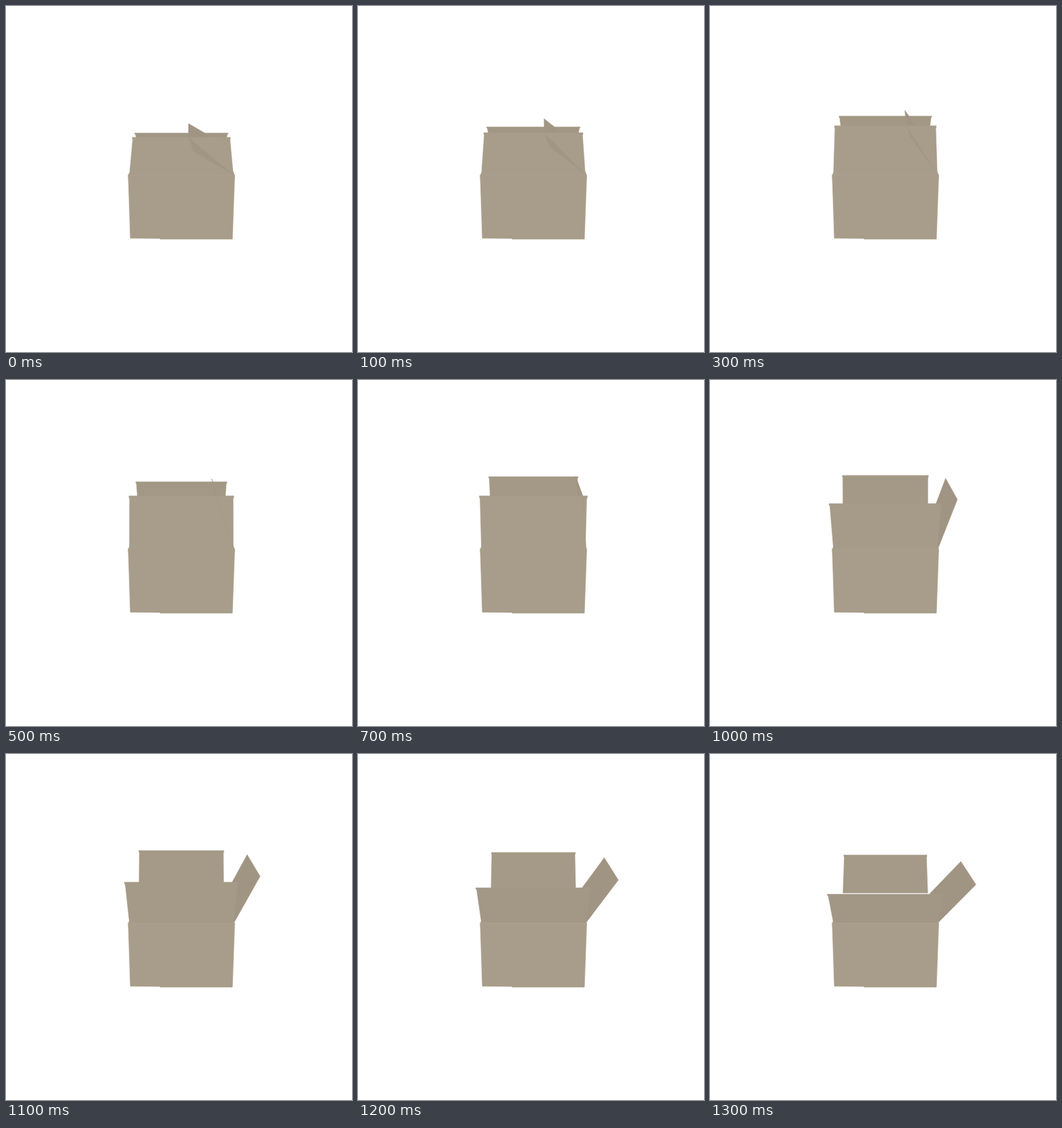
An HTML page that plays this animation: 512x512 px, repeating every 1400 ms.

```html
<!DOCTYPE html>
<html lang="en">
<head>
<meta charset="utf-8">
<title>Opening box</title>
<style>
  html, body { margin: 0; width: 100%; height: 100%; overflow: hidden; background: #fff; }
  svg { display: block; width: 100%; height: 100%; }
  polygon { stroke: #a69b88; stroke-width: 0.6; stroke-linejoin: round; }
</style>
</head>
<body>
<svg viewBox="0 0 512 512">
  <polygon id="back"/>
  <polygon id="side" fill="#a09483"/>
  <polygon id="body" fill="#a89d8a"
    points="183,246.5 336.5,246.5 338.5,250.5 338,262 335,345 228,345 228,344 184,343.7 181.3,262 180.7,250.5"/>
  <polygon id="front"/>
  <polygon id="poke" fill="#a19583"/>
  <path id="fold" d="M182 250.5H337.5" stroke="#aca18e" fill="none"/>
</svg>
<script>
const LOOP = 1400, STEP = 100;
const FOCAL = 712, DIST = 719.7, PITCH = 19.2 * Math.PI / 180;
const HALF = 78.5, DEPTH = 171, FLAP = 79.6, LIP = 0.9;
const SIN = Math.sin(PITCH), COS = Math.cos(PITCH);
const el = id => document.getElementById(id);
const rad = deg => deg * Math.PI / 180;

// x: right, h: up from the rim, d: back from the front rim
function project([x, h, d]) {
  const z = (DIST + d * COS - h * SIN) / FOCAL;
  const y = -6 - h * COS - d * SIN;
  return (259.5 + x / z).toFixed(2) + ',' + (256 + y / z).toFixed(2);
}

function setPoly(id, pts) {
  el(id).setAttribute('points', pts.map(project).join(' '));
}

// front or back flap, a little wider along its free edge
function setFlap(id, hinge, dir, deg) {
  const a = rad(deg);
  const at = (x, s) => [x, s * FLAP * Math.sin(a), hinge + dir * s * FLAP * Math.cos(a)];
  const half = [[HALF - LIP, 0], [HALF - LIP, 0.96], [HALF, 0.96], [HALF, 1]];
  const right = half.map(([x, s]) => at(x, s));
  const left = half.map(([x, s]) => at(-x, s)).reverse();
  setPoly(id, [...right, ...left]);
}

function shade(id, drop) {
  const rgb = [168, 157, 138].map(c => Math.round(c - drop));
  el(id).setAttribute('fill', `rgb(${rgb})`);
}

function draw(ms) {
  const deg = 30.65 + 7.8 * Math.floor(ms / STEP);
  const a = rad(deg);
  const run = FLAP * Math.cos(a), rise = FLAP * Math.sin(a);
  // point on the side flap at share s of its length
  const side = (s, d) => [HALF + 3 * d / DEPTH - s * run, s * rise, d];

  setFlap('back', DEPTH, -1, deg - 1);
  setFlap('front', 0, 1, deg);
  setPoly('side', [side(0, 0), side(1, 0), side(1, 168), side(0, 168)]);
  shade('back', 6 - 3 * (deg - 30) / 100);
  shade('front', Math.max(0, deg - 95) * 0.16);

  // part of the side flap that cuts through the front flap
  const crossing = run > 0;
  el('poke').style.display = crossing ? '' : 'none';
  if (crossing) setPoly('poke', [side(0, 0), side(0.88, 0), side(1, run)]);

  el('fold').style.opacity = Math.min(1, Math.abs(deg - 93) / 25);
}

function tick() {
  draw(performance.now() % LOOP);
  requestAnimationFrame(tick);
}
tick();
</script>
</body>
</html>
```
